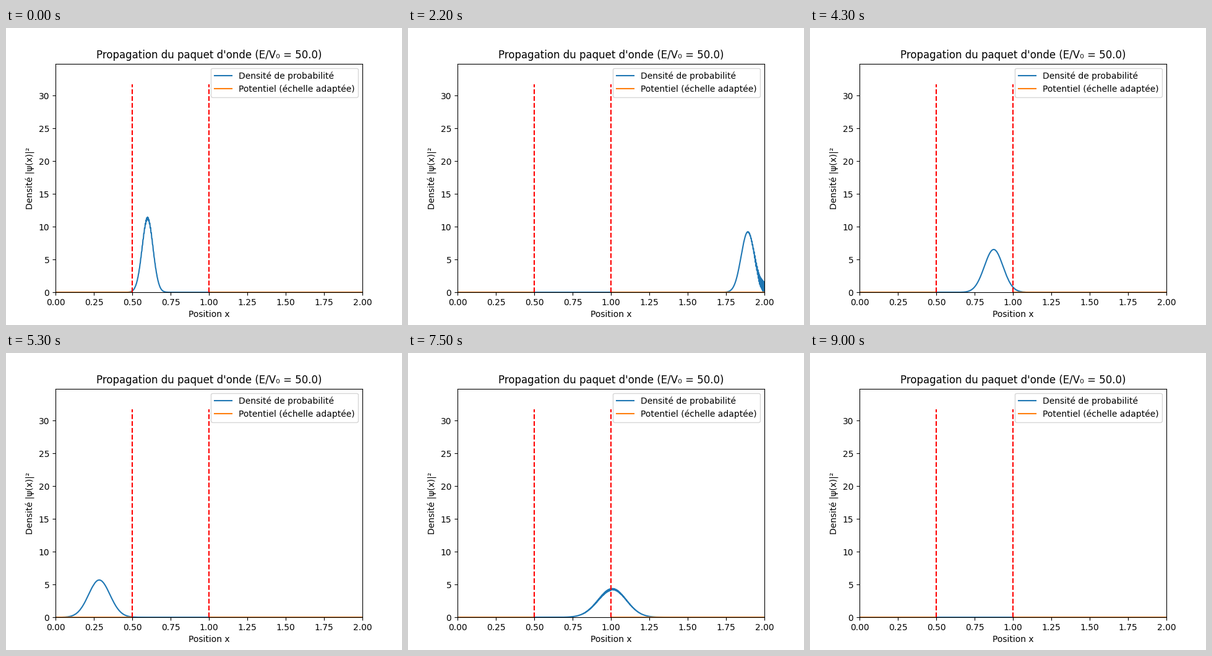
A matplotlib script for the animation above (9100 ms loop, 640x480 px).

```python
import numpy as np
import matplotlib.pyplot as plt
from matplotlib.animation import FuncAnimation

# Grid and time step
DX, DT = 0.001, 1e-7
NX, NT, STRIDE = 2000, 90000, 1000
N_FRAMES = NT // STRIDE + 1

# Wave packet and potential well
XC, SIGMA = 0.6, 0.05
V0, RATIO = -4000, 50.0
LEFT, RIGHT = 0.5, 1.0

x = np.linspace(0, (NX - 1) * DX, NX)
V = np.where((x >= LEFT) & (x <= RIGHT), V0, 0.0)


def simulate():
    """Leapfrog Schrödinger solver; the last row stays empty."""
    s = DT / DX**2
    k = np.sqrt(2 * abs(RATIO * V0))
    amp = 1 / np.sqrt(SIGMA * np.sqrt(np.pi))
    psi = amp * np.exp(1j * k * x - (x - XC) ** 2 / (2 * SIGMA**2))
    re, im = psi.real.copy(), psi.imag.copy()
    diag = 2 * (s + V[1:-1] * DT)
    rows = np.zeros((N_FRAMES, NX))
    for i in range(1, NT):
        if i % 2:
            record = (i - 1) % STRIDE == 0
            if record:
                old = im[1:-1].copy()
            im[1:-1] += s * (re[2:] + re[:-2]) - diag * re[1:-1]
            if record:
                rows[(i - 1) // STRIDE, 1:-1] = re[1:-1] ** 2 + im[1:-1] * old
        else:
            re[1:-1] -= s * (im[2:] + im[:-2]) - diag * im[1:-1]
    return rows


density = simulate()
peak = density.max()

fig, ax = plt.subplots(figsize=(6.4, 4.8), dpi=100)
ax.set_xlim(0, 2)
ax.set_ylim(0, 1.1 * peak)
ax.set_title(f"Propagation du paquet d'onde (E/V₀ = {RATIO})")
ax.set_xlabel("Position x")
ax.set_ylabel("Densité |ψ(x)|²")

curve, = ax.plot([], [], label="Densité de probabilité")
ax.plot(x, V / abs(V0) * peak, label="Potentiel (échelle adaptée)")
ax.vlines([LEFT, RIGHT], 0, peak, colors="red", linestyles="--")
ax.legend(loc="upper right")


def update(i):
    curve.set_data(x, density[i])
    return curve,


anim = FuncAnimation(fig, update, frames=N_FRAMES, interval=100,
                     repeat=True, repeat_delay=0)
plt.show()
```
